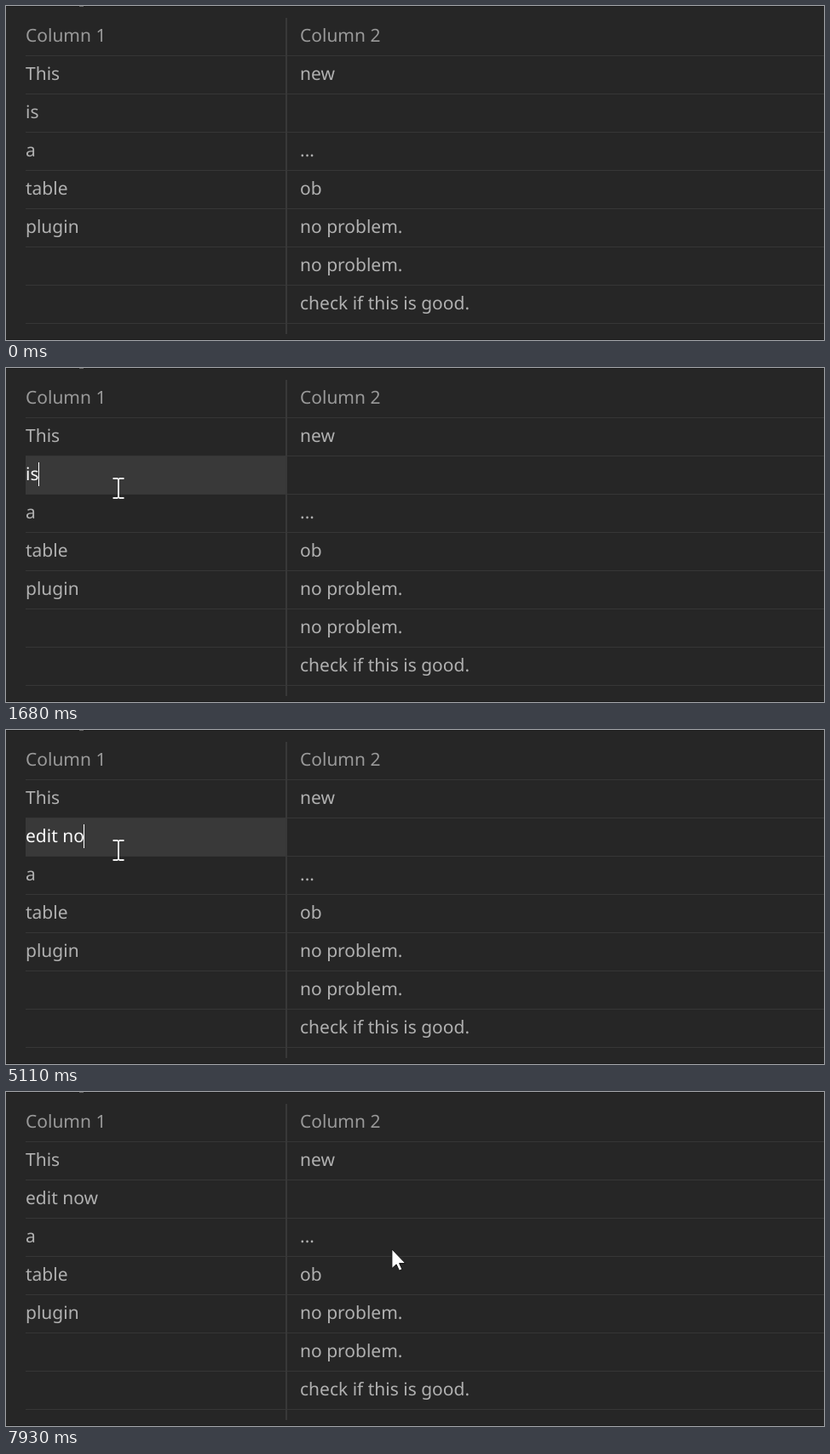
Recreate the animation shown at these times as an HTML page. Size 960 by 393 pixels, loop 8 s.

```html
<!DOCTYPE html>
<html lang="en">
<head>
<meta charset="utf-8">
<title>Table cell editing</title>
<style>
  html, body { margin: 0; width: 100%; height: 100%; overflow: hidden; background: #262626; }
  #stage {
    position: relative; width: 960px; height: 393px; overflow: hidden; background: #262626;
    color: #b0b0b0; font: 21px/44px "Noto Sans", sans-serif; text-rendering: geometricPrecision;
  }
  #stage div, #stage svg { position: absolute; }
  .edge { left: 0; width: 960px; height: 1px; background: #1b1b1b; }
  .speck { left: 86px; top: 0; width: 5px; height: 1px; background: #606060; }
  .row { left: 23px; width: 937px; height: 45px; border-bottom: 1px solid #363636; white-space: pre; }
  .row.head { color: #999; }
  .row span { position: absolute; left: 0; top: 0; }
  .row span + span { left: 322px; }
  .rule { left: 328px; top: 14px; width: 2px; height: 372px; background: #383838; }
  #cell { left: 23px; top: 104px; width: 305px; height: 44px; white-space: pre; }
  #cell.focus { background: #393939; color: #fafafa; }
  #word { position: absolute; left: 0; top: -1px; }
  #select { left: 0; top: 6px; width: 15px; height: 32px; background: #335e72; }
  #caret { top: 7px; width: 1px; height: 28px; background: #fff; }
  #arrow, #beam { left: 0; top: 0; overflow: visible; }
  #click { left: 111px; top: 122px; width: 36px; height: 36px; border-radius: 50%; background: rgba(255, 250, 0, .48); }
</style>
</head>
<body>
<div id="stage">
  <div class="edge" style="top:0"></div>
  <div class="speck"></div>
  <div class="edge" style="top:392px"></div>
  <div id="rows"></div>
  <div class="rule"></div>
  <div id="cell">
    <div id="select"></div><span id="word"></span><div id="caret"></div>
  </div>
  <svg id="beam" width="20" height="30">
    <path d="M125.5 130H130.5L132 131L133.5 130H138.5M125.5 153H130.5L132 152L133.5 153H138.5M132 131V152"
      fill="none" stroke="#eee" stroke-width="1.8"/>
  </svg>
  <svg id="arrow" width="18" height="27">
    <path d="M.9 1V23.6L6.1 18.9L9.5 26.2L12.9 24.6L9.6 17.6H16.8Z"
      fill="#fff" stroke="#111" stroke-width="1"/>
  </svg>
  <div id="click"></div>
</div>
<script>
  const LOOP = 8000;
  const $ = id => document.getElementById(id);
  const [cell, word, select, caret, arrow, beam, click] =
    ["cell", "word", "select", "caret", "arrow", "beam", "click"].map($);

  const rows = [
    ["Column 1", "Column 2"], ["This", "new"], ["", ""], ["a", "..."], ["table", "ob"],
    ["plugin", "no problem."], ["", "no problem."], ["", "check if this is good."]
  ];
  rows.forEach((texts, i) => {
    const row = document.createElement("div");
    row.className = i ? "row" : "row head";
    row.style.top = 13 + 45 * i + "px";
    for (const text of texts) row.appendChild(document.createElement("span")).textContent = text;
    $("rows").appendChild(row);
  });

  const keys = [3570, 3770, 3970, 4170, 4700, 4900, 5110, 5500];
  const rest = [129, 140];
  const leave = [[139, 146], [183, 164], [260, 189], [348, 206], [424, 209], [458, 202], [452, 184]];

  const within = (t, a, b) => t >= a && t < b;
  const show = (el, on) => { el.style.visibility = on ? "visible" : "hidden"; };

  function arrowAt(t) {
    if (t < 1340) {
      const step = t < 1270 ? Math.min(9, Math.floor((t - 520) / 70)) : 10;
      const left = 1 - Math.max(0, step) / 10;
      return [131 + 489 * left ** 2.43, 143 + 212 * left ** 2.13];
    }
    return t < 7510 ? rest : leave[Math.min(6, Math.floor((t - 7510) / 70))];
  }

  function render(t) {
    const editing = within(t, 1680, 7040);
    const typed = keys.filter(k => t >= k).length;
    const text = typed ? "edit now".slice(0, typed) : "is";
    if (word.textContent !== text) word.textContent = text;
    cell.className = editing ? "focus" : "";

    const selected = within(t, 2810, 3570);
    const blink = within(t, 2210, 2750) || within(t, 6030, 6560);
    show(select, selected);
    show(caret, editing && !selected && !blink);
    caret.style.left = Math.floor(word.getBoundingClientRect().width - .42) + "px";

    const [x, y] = arrowAt(t);
    arrow.style.transform = `translate(${Math.round(x)}px, ${Math.round(y)}px)`;
    show(arrow, t >= 520 && !editing);
    show(beam, editing);
    show(click, within(t, 1340, 1470) || within(t, 1540, 1680));
  }

  const start = performance.now();
  function tick() {
    render((performance.now() - start) % LOOP);
    requestAnimationFrame(tick);
  }
  render(0);
  requestAnimationFrame(tick);
</script>
</body>
</html>
```
